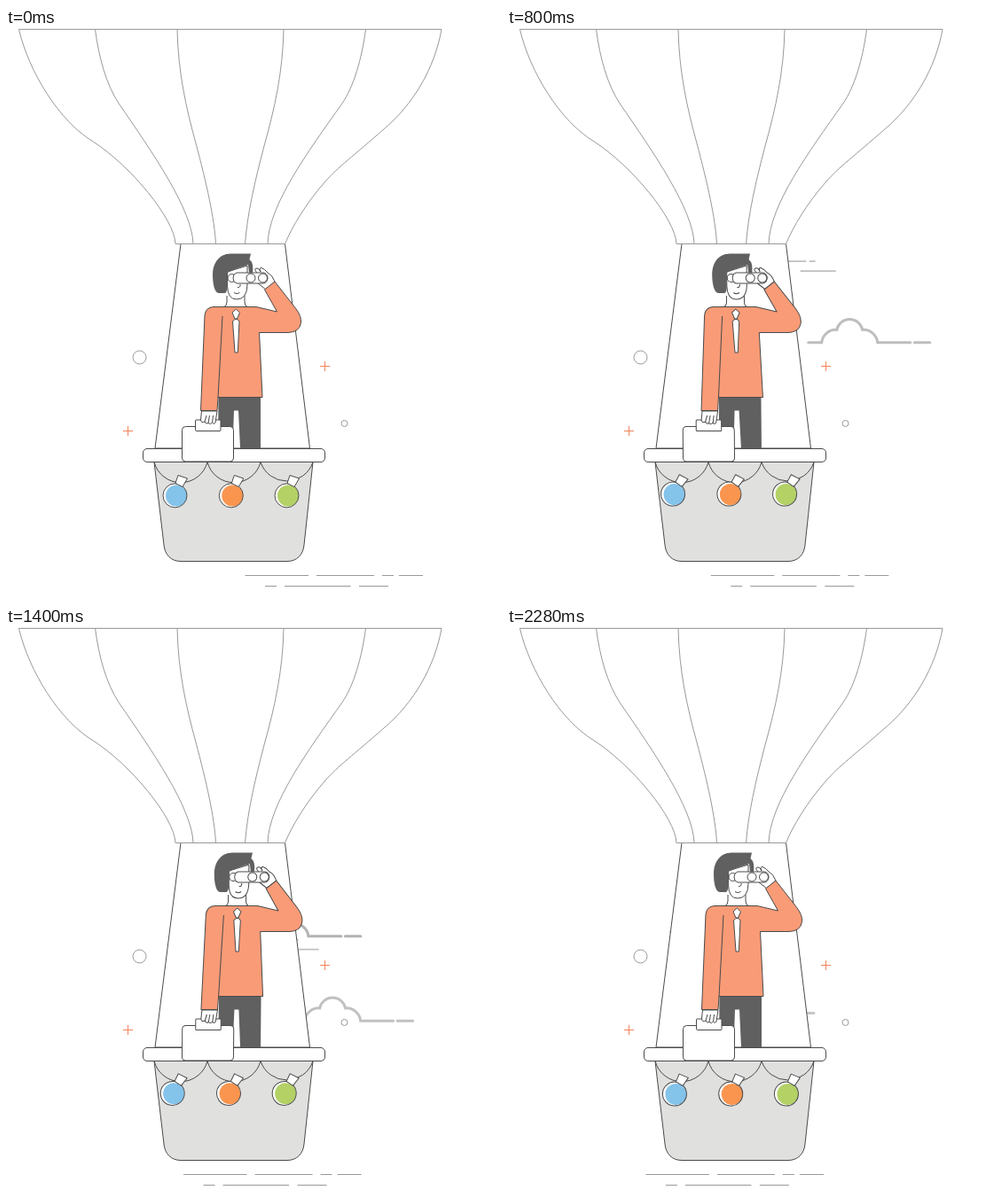
Write an HTML page that moves like this. It is 558x644 px and loops after 2320 ms.

```html
<!DOCTYPE html>
<html lang="en">
<head>
<meta charset="utf-8">
<title>Balloon lookout</title>
<style>
  html, body { margin: 0; width: 100%; height: 100%; overflow: hidden; background: #fff; }
  svg { display: block; width: 558px; height: 644px; }
  .thin { fill: none; stroke: #999; }
  .ink { fill: #fff; stroke: #4a4a4a; stroke-linejoin: round; }
  .line { fill: none; }
  .dark { fill: #606060; stroke: none; }
  .shirt { fill: #f99b77; }
</style>
</head>
<body>
<svg viewBox="0 0 558 644">
  <defs>
    <g id="cloud" fill="none" stroke="#999">
      <path stroke-width="3" stroke-linecap="round" d="M1 0H16A16 16 0 0 1 33-14.3A14.8 14.8 0 0 1 62-14.3A16 16 0 0 1 79 0H116M120.500 0H138"/>
      <path stroke-width="1.700" d="M-25-91.500H-1.500M2-91.500H9M-8-80.600H32"/>
    </g>
    <g id="flask">
      <circle cx="-8.500" cy="21.300" r="13.500" style="fill:#fff"/>
      <circle cx="-7" cy="21.500" r="12"/>
      <circle class="ink line" cx="-8.500" cy="21.300" r="13.500"/>
      <path class="ink" d="M-5-1.500L5.500 2L0 11.500L-8 7.500Z"/>
    </g>
  </defs>

  <g id="clouds"><use href="#cloud"/><use href="#cloud"/></g>

  <path class="thin" d="M143 371.500a7.500 7.500 0 1 0 15 0a7.500 7.500 0 1 0-15 0M378 446a3.500 3.500 0 1 0 7 0a3.500 3.500 0 1 0-7 0"/>
  <path d="M132 454.500H143M137.500 449V460M354 381.500H365M359.500 376V387" stroke="#f2845c"/>
  <path id="ground" class="thin" d="M269.500 617.500H341M350 617.500H415M424 617.500H437M443 617.500H470M292 629.500H305M314 629.500H388.500M398 629.500H431"/>

  <path class="ink" d="M197 243.500L168 474H342.500L314.500 243.500"/>
  <path class="thin" d="M14.500 1.500H491M191 243.500H314.500
    M14.500 1.500C26 50 60 105 98 128C140 155 190 215 191 243.500
    M100.500 1.500C105 35 113 63 127 85C165 140 210 205 211 243.500
    M193 1.500C194 50 203 90 214 130C226 175 235 215 236.500 243.500
    M313 1.500C312 50 303 90 291 133C280 175 272 210 269.500 243.500
    M405.500 1.500C401 35 392 66 379 85C340 140 296 200 295 243.500
    M491 1.500C483 46 459 86 426 114C392 144 374 157 360 173C338 198 322 225 314.500 243.500"/>

  <path class="ink" style="fill:#e0e0df" d="M167 489.500L178 583C179 594 186 601.500 197 601.500H317C328 601.500 335 594 336 583L346 489.500Z"/>
  <path class="ink line" d="M167 489.500A31 31 0 0 0 227 489.500A31 31 0 0 0 287 489.500A31 31 0 0 0 346 489.500"/>
  <g id="flasks">
    <use href="#flask" fill="#84c3ea"/><use href="#flask" fill="#f9954f"/><use href="#flask" fill="#b3d165"/>
  </g>
  <rect class="ink" x="154.500" y="474.500" width="205" height="15" rx="4.500"/>

  <g id="man">
    <path class="dark" d="M239.500 416H287V474H264L262 431.500H257L255.500 474H239Z"/>
    <path class="ink" d="M249 302V309Q249 314 245 315H273Q269 314 269 309V302"/>
    <path class="ink" d="M249.500 275V291Q250 306 260 306Q271.500 306 272 290V268Z"/>
    <path class="dark" d="M276 254.500H253C240 255 233 265 233 279C233 288 235 299 240 299H247Q249.500 298 249.500 290V276Q254 273 273 267L274 276H278Q279 268 277 264L274.500 261Z"/>
    <path class="ink line" d="M257 298.500Q260 301 263.500 298.500M264 289Q264.500 293 261 292.500"/>
    <path class="ink" d="M283 276Q279 272 282 271Q285 270 287 275Q285 270 288 270.500Q292 272 295 276Q300 278 303 286L293 295L284 288Z"/>
    <circle class="ink" cx="254.500" cy="282" r="4.500"/>
    <path class="ink" d="M260 276H290A5 6 0 0 1 290 288H260Q256 287 256 282Q256 277 260 276Z"/>
    <circle class="ink" cx="276" cy="282" r="5"/>
    <circle class="ink" cx="289.500" cy="282" r="5"/>
    <path class="ink shirt" d="M224 324Q225 315 234 314.500H282L305.500 320L291.500 295L303 286L326 315.500Q333.500 325 332.500 332.500Q331 343 318 343.500H285.500L289 416.500H239L238 431.500H219.500Z"/>
    <path class="ink line" d="M244 325L239 417"/>
    <path class="ink" d="M259.300 317L263.500 321L260.500 328H258L255 321ZM258 328.500H261L263 331L261.300 366H258L255.500 331Z"/>
    <rect class="ink" x="198.500" y="449.500" width="58" height="39.500" rx="4"/>
    <rect class="ink" x="213.500" y="442" width="28.500" height="12.500" rx="1"/>
    <path class="ink" d="M220.500 432H238L236 445Q234 448 232.500 445Q230.500 448 228 445.500Q225.500 447.500 224 444Q220 446 219.500 442Z"/>
    <path class="ink line" d="M224 444L226 437M228 445.500L229.500 437M232.500 445L233.500 437"/>
  </g>
</svg>
<script>
const LOOP = 2320;
const el = id => document.getElementById(id);
const move = (node, value) => node.setAttribute('transform', value);

// Cosine-eased value through [time, value] keys.
function along(keys, t) {
  const i = keys.findIndex(k => k[0] > t);
  if (i < 0) return keys[keys.length - 1][1];
  const [t0, a] = keys[i - 1], [t1, b] = keys[i];
  return a + (b - a) * (1 - Math.cos(Math.PI * (t - t0) / (t1 - t0))) / 2;
}

const sway = [[0, 0], [580, -2.8], [1400, 2], [2240, 0]];
const swing = [[0, 0], [120, 0], [800, 9.5], [960, 9.5], [2100, 4.3]];
const drift = [{ start: 240, x: 410.4, y: 360.2 }, { start: 880, x: 387.2, y: 449.3 }];
const LIFE = 1860;

function draw(t) {
  drift.forEach((c, i) => {
    const age = t - c.start, node = el('clouds').children[i];
    const shown = age >= 0 && age < LIFE;
    node.setAttribute('opacity', shown ? 0.2 + 0.72 * (1 - Math.abs(2 * age / LIFE - 1)) : 0);
    move(node, `translate(${c.x - 0.128 * age} ${c.y - 0.0098 * age})`);
  });
  move(el('ground'), `translate(${-0.0496 * t})`);

  const lean = -along(sway, t) / 226;
  move(el('man'), `matrix(1 0 ${lean} 1 ${-lean * 480} 0)`);

  const angle = along(swing, t);
  [199, 262.3, 325].forEach((x, i) =>
    move(el('flasks').children[i], `translate(${x} 506) rotate(${angle})`));
}

const begin = performance.now();
function tick() {
  const t = (performance.now() - begin) % LOOP;
  draw(Math.floor(t / 40) * 40);
  requestAnimationFrame(tick);
}
tick();
</script>
</body>
</html>
```
